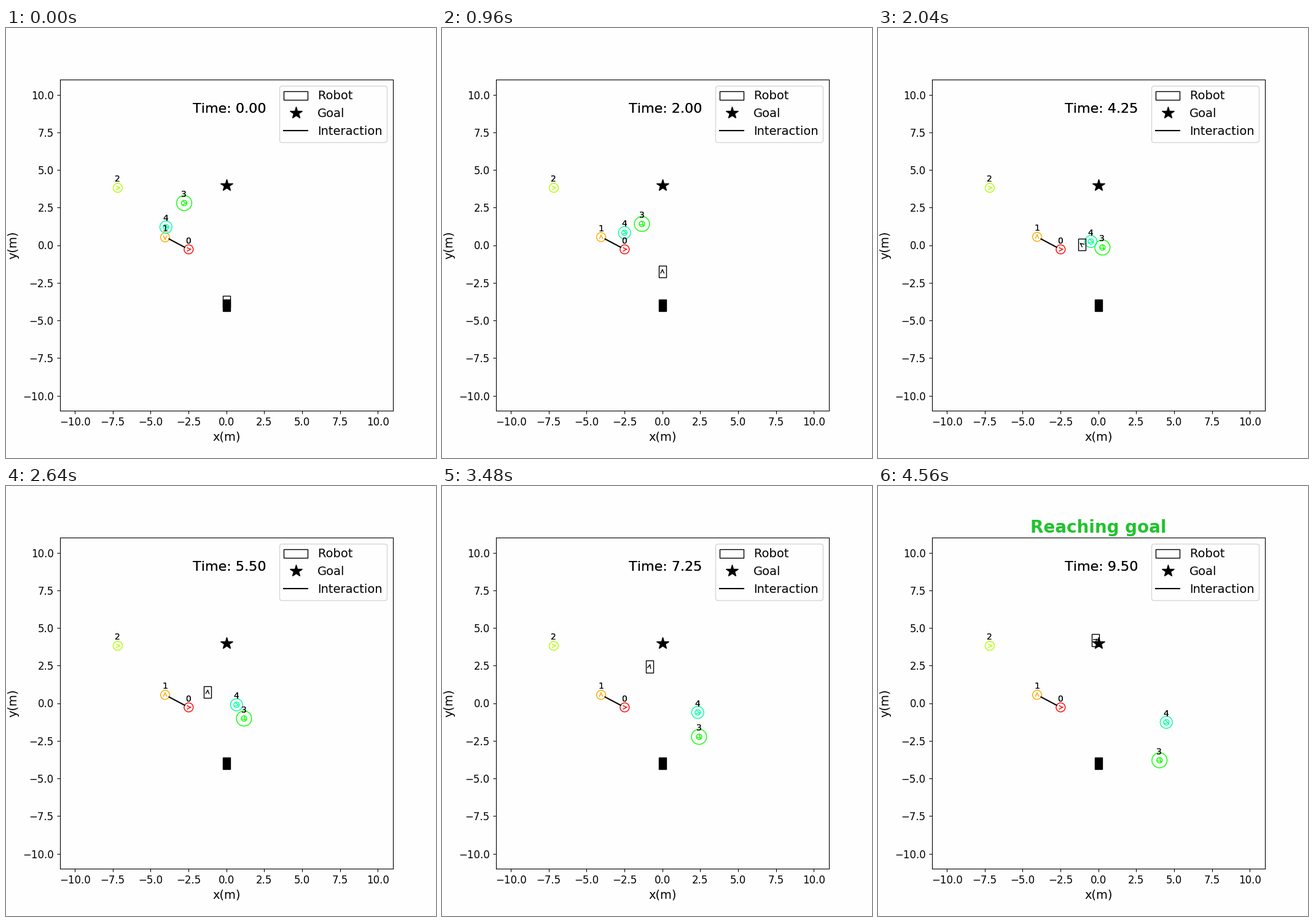
Write a matplotlib script that moves like this. It is 700 by 700 pixels and loops after 4.68 s.

```python
import numpy as np
import matplotlib.pyplot as plt
from matplotlib.animation import FuncAnimation
from matplotlib.lines import Line2D
from matplotlib.patches import ArrowStyle, Circle, FancyArrowPatch, Rectangle

FRAMES, INTERVAL, STEP = 39, 120, 0.25
ROBOT = np.array([0.5, 0.8])
START, GOAL = np.array([0, -4]), np.array([0, 4])

plt.rcParams.update({
    "text.kerning_factor": 6,  # whole-pixel kerning
    "figure.facecolor": "#fefefe",
    "axes.facecolor": "#fefefe",
})

fig, ax = plt.subplots(figsize=(7, 7), dpi=100)
ax.set_xlim(-11, 11)
ax.set_ylim(-11, 11)
ax.tick_params(labelsize=12)
ax.set_xlabel("x(m)", fontsize=14)
ax.set_ylabel("y(m)", fontsize=14)

cmap = plt.get_cmap("hsv", 10)
head = ArrowStyle("->", head_length=4, head_width=2)
steps = np.arange(FRAMES)


def path(x, y):
    """Positions for every step, one row each."""
    return np.column_stack(np.broadcast_arrays(x, y, steps)[:2])


def headings(pos):
    dx, dy = np.gradient(pos, axis=0).T
    return np.arctan2(dy, dx)


def smooth(u):
    u = np.clip(u, 0, 1)
    return u * u * (3 - 2 * u)


def ring(radius, color):
    return ax.add_patch(Circle((0, 0), radius, fill=False, ec=color))


def arrow(color):
    return ax.add_patch(FancyArrowPatch((0, 0), (1, 0), color=color, arrowstyle=head))


def aim(patch, pos, length, angle):
    patch.set_positions(pos, pos + length * np.array([np.cos(angle), np.sin(angle)]))


def bold_text(*args, **kw):
    """Overprinted text, which darkens the antialiased edges."""
    return [ax.text(*args, **kw) for _ in range(2)]


class Person:
    """Ring, heading arrow and number; a mover also has an inner ring."""

    def __init__(self, idx, radius, pos, first=0, facing=None):
        color = cmap(idx)
        mover = facing is None
        self.pos = pos
        self.angle = headings(pos) if mover else np.full(FRAMES, np.radians(facing))
        self.angle[0] = np.radians(first)
        self.reach = 0.2 if mover else radius
        self.rings = [ring(r, color) for r in ((radius, 0.18) if mover else (radius,))]
        self.arrow = arrow(color)
        self.labels = bold_text(0, 0, str(idx), fontsize=10)

    def update(self, i):
        pos = self.pos[i]
        for r in self.rings:
            r.center = pos
        aim(self.arrow, pos, self.reach, self.angle[i])
        for label in self.labels:
            label.set_position(pos + (-0.2, 0.4))


settle = np.exp(-steps / 7.3)
people = [
    Person(0, 0.3, path(-2.49, -0.28), facing=0),
    Person(1, 0.3, path(-4.045, 0.515 + 0.035 * smooth(steps / 15)), first=-90, facing=90),
    Person(2, 0.3, path(-7.17, 3.81), facing=0),
    Person(3, 0.5, path(-2.785 + 0.1795 * steps, 2.796 - 0.1735 * steps)),
    Person(4, 0.4, path(-4.64 + 0.24 * steps + 0.65 * settle,
                        1.523 - 0.0735 * steps - 0.32 * settle)),
]

# The robot slows while it gives way to the left, then brakes at the goal.
speed = 0.25 - 0.15 * np.exp(-((steps - 18) / 4) ** 2)
speed *= np.minimum(1, (FRAMES - steps) / 5)
detour = 1.24 * smooth((steps - 10) / 9)
back = 1.05 * np.clip((steps - 22) / 16, 0, 1) ** 1.2
robot_pos = path(back - detour, START[1] + np.cumsum(speed) - 0.01)
robot_angle = headings(robot_pos)

robot = ax.add_patch(Rectangle((0, 0), *ROBOT, fill=False, ec="black"))
robot_arrow = arrow("black")
ax.add_patch(Rectangle(START - ROBOT / 2, *ROBOT, color="black"))
goal = ax.add_line(Line2D(*GOAL[:, None], color="black", marker="*", ls="None", markersize=15))

# The interaction link runs between the rims of persons 0 and 1.
a, b = people[0].pos[-1], people[1].pos[-1]
rim = 0.3 * (b - a) / np.hypot(*(b - a))
link = ax.add_line(Line2D(*zip(a + rim, b - rim), color="black", lw=1.5))

ax.legend([robot, goal, link], ["Robot", "Goal", "Interaction"],
          loc="upper right", fontsize=14)
clock = bold_text(0.4, 0.9, "", fontsize=16, transform=ax.transAxes)
title = ax.set_title("Reaching goal", fontsize=20, fontweight="bold", color="#22c22e")


def draw(i):
    for p in people:
        p.update(i)
    robot.set_xy(robot_pos[i] - ROBOT / 2)
    aim(robot_arrow, robot_pos[i], 0.3, robot_angle[i])
    for t in clock:
        t.set_text(f"Time: {i * STEP:.2f}")
    title.set_visible(i == FRAMES - 1)


anim = FuncAnimation(fig, draw, frames=FRAMES, interval=INTERVAL, repeat=True)
plt.show()
```
